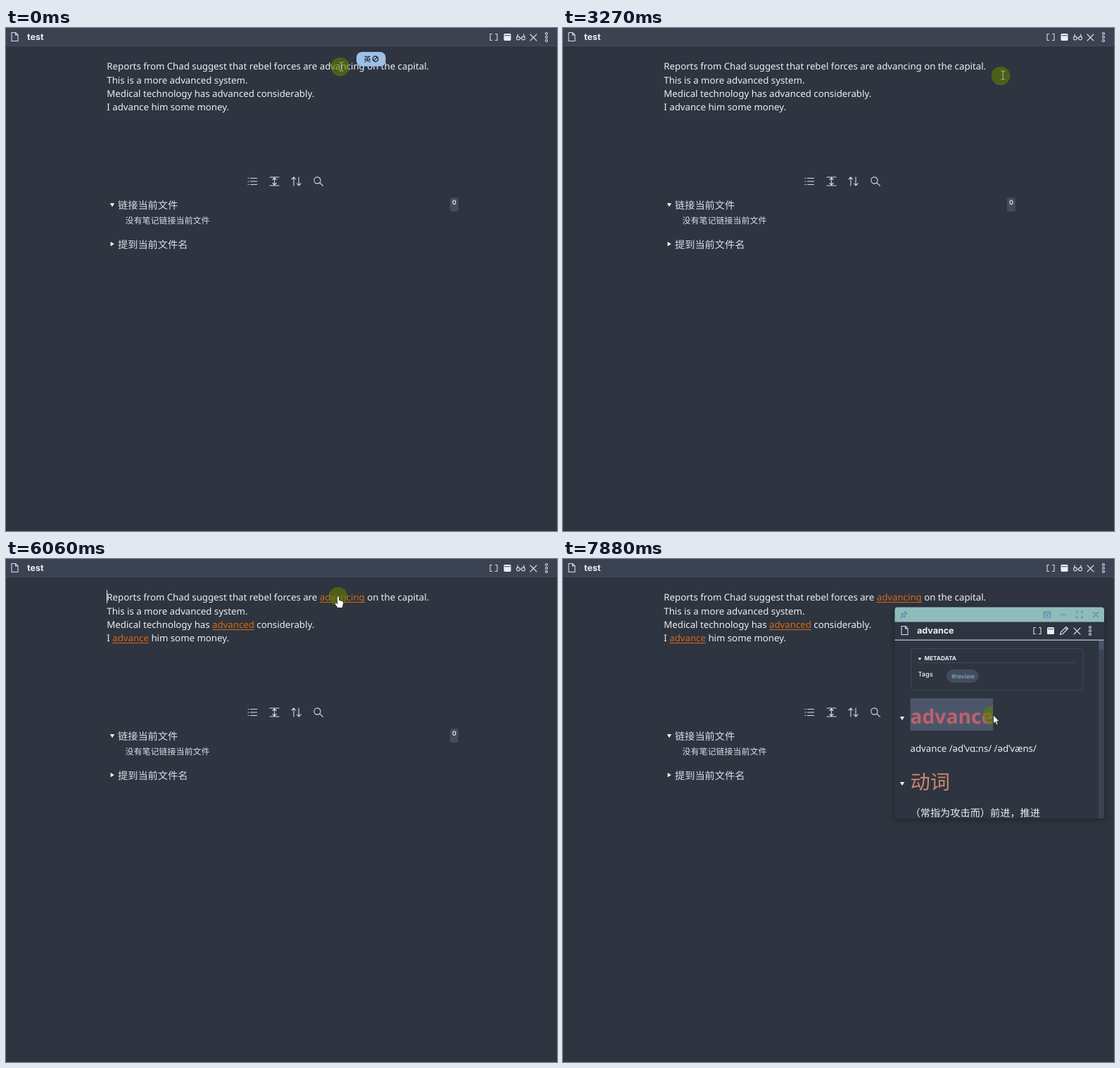
An HTML page with a canvas for the animation above (8 s loop, 783 by 715 pixels).

```html
<!DOCTYPE html>
<html lang="zh">
<head>
<meta charset="utf-8">
<title>Note editor</title>
<style>
html, body { margin: 0; width: 100%; height: 100%; overflow: hidden; background: #2e3440; }
canvas { display: block; }
</style>
</head>
<body>
<canvas id="stage" width="783" height="715"></canvas>
<script>
const ctx = document.getElementById('stage').getContext('2d');
ctx.textRendering = 'geometricPrecision';

const LOOP = 8000;
const BODY = '"Noto Sans", "Noto Sans CJK SC", sans-serif';
const UI = 'Inter, "Noto Sans CJK SC", sans-serif';
const CJK = '"Noto Sans CJK SC", "Noto Sans CJK", sans-serif';
const C = {
  bg: '#2e3440', bar: '#3b4252', edge: '#434c5e', select: '#4c566a',
  text: '#eceff4', soft: '#d8dee9', link: '#d8690f', teal: '#8fbcbb',
  blue: '#5e81ac', red: '#bf616a', orange: '#d08770'
};

// Pointer: bursts of movement [start, end, steps] and the path [time, x, y]
const BURSTS = [
  [1290, 1930, 8], [2470, 3270, 10], [3360, 3630, 4],
  [5450, 6250, 10], [6520, 7320, 10], [7520, 7880, 5]
];
const PATH = [
  [1280, 475, 55], [1380, 507, 60], [1460, 528, 65], [1650, 555, 82], [1930, 565, 97],
  [2640, 565, 97], [2900, 596, 82], [3270, 622, 68], [3360, 624, 67], [3630, 621, 63],
  [5450, 621, 63], [5530, 612, 60], [5720, 548, 55], [5980, 472, 53],
  [6520, 472, 53], [6780, 524, 118], [6900, 531, 160], [7060, 514, 214], [7150, 504, 226],
  [7320, 497, 224], [7520, 497, 224], [7880, 610, 222]
];
const POINTERS = [
  [0, 'beam'], [1290, 'arrow'], [1375, 'hand'], [2560, 'beam'], [5800, 'hand'],
  [6600, 'arrow'], [7050, 'beam'], [7870, 'arrow']
];
const CARETS = [
  [2560, 3090, 475], [3630, 4160, 475], [4700, 4980, 475],
  [4980, 5450, 143], [5980, 6170, 143]
];
const T = { menu: 920, bubble: 1010, close: 2560, links: 4980, popup: 6170, focus: 6340, drag: 7520 };

function stepTime(t) {
  let held = 0;
  for (const [start, end, n] of BURSTS) {
    if (t < start) break;
    const gap = (end - start) / (n - 1);
    held = Math.min(end, start + Math.floor((t - start + 12) / gap) * gap);
  }
  return held;
}

function pathAt(t) {
  if (t <= PATH[0][0]) return PATH[0].slice(1);
  for (let i = 1; i < PATH.length; i++) {
    const [t0, x0, y0] = PATH[i - 1], [t1, x1, y1] = PATH[i];
    if (t <= t1) {
      const k = (t - t0) / (t1 - t0);
      return [x0 + (x1 - x0) * k, y0 + (y1 - y0) * k];
    }
  }
  return PATH[PATH.length - 1].slice(1);
}

function text(str, x, y, font, color = C.text, align = 'left') {
  ctx.font = font;
  ctx.fillStyle = color;
  ctx.textAlign = align;
  ctx.fillText(str, x, y);
}

function rect(x, y, w, h, color) {
  ctx.fillStyle = color;
  ctx.fillRect(x, y, w, h);
}

function round(x, y, w, h, r, fill, stroke) {
  ctx.beginPath();
  ctx.roundRect(x, y, w, h, r);
  if (fill) { ctx.fillStyle = fill; ctx.fill(); }
  if (stroke) { ctx.strokeStyle = stroke; ctx.lineWidth = 1; ctx.stroke(); }
}

function shape(d, x, y, { fill, stroke, width = 1 }) {
  const p = new Path2D(d);
  ctx.save();
  ctx.translate(x, y);
  ctx.lineJoin = ctx.lineCap = 'round';
  if (fill) { ctx.fillStyle = fill; ctx.fill(p); }
  if (stroke) { ctx.strokeStyle = stroke; ctx.lineWidth = width; ctx.stroke(p); }
  ctx.restore();
}

const icon = (d, x, y, stroke = C.soft, width = 1.1) => shape(d, x, y, { stroke, width });

// Icon outlines, centred on 0,0
const I = {
  file: 'M-4.5-6H1L4.5-2.5V6H-4.5ZM1-6V-2.5H4.5',
  brackets: 'M-2.5-4.5H-5V4.5H-2.5M2.5-4.5H5V4.5H2.5',
  glasses: 'M-6 1.5L-4-4M6 1.5L4-4M-1.2 1.5a2.4 2.4 0 1 1-4.8 0a2.4 2.4 0 1 1 4.8 0H1.2a2.4 2.4 0 1 0 4.8 0a2.4 2.4 0 1 0-4.8 0',
  cross: 'M-4.5-4.5L4.5 4.5M4.5-4.5L-4.5 4.5',
  dots: 'M1.5-5a1.5 1.5 0 1 1-3 0a1.5 1.5 0 1 1 3 0M1.5 0a1.5 1.5 0 1 1-3 0a1.5 1.5 0 1 1 3 0M1.5 5a1.5 1.5 0 1 1-3 0a1.5 1.5 0 1 1 3 0',
  pencil: 'M-5.5 5.5L-4.5 2L3-5.5L5.5-3L-2 4.5ZM1.5-4L4-1.5',
  list: 'M-2.5-4.5H6.5M-2.5 0H6.5M-2.5 4.5H6.5M-6-4.5H-5M-6 0H-5M-6 4.5H-5',
  height: 'M-6.5-6H6.5M-6.5 6H6.5M0-5V5M-2.5-2.5L0-5L2.5-2.5M-2.5 2.5L0 5L2.5 2.5',
  sort: 'M-3.5 6V-6M-6.5-3L-3.5-6L-.8-3M3.5-6V6M.8 3L3.5 6L6.5 3',
  search: 'M3-1.5a4.6 4.6 0 1 1-9.2 0a4.6 4.6 0 1 1 9.2 0M1.8 2L6.5 6.3',
  check: 'M-4.5 .5L-1.5 3.5L5-3.5',
  help: 'M5.3 0a5.3 5.3 0 1 1-10.6 0a5.3 5.3 0 1 1 10.6 0M-1.6-1.2Q-1.5-2.8 0-2.8T1.6-1.2Q1.5-.2 0 .8M0 2.8V3',
  cut: 'M-2 2.8a1.8 1.8 0 1 1-3.6 0a1.8 1.8 0 1 1 3.6 0M-2-2.8a1.8 1.8 0 1 1-3.6 0a1.8 1.8 0 1 1 3.6 0M-2.3 1.8L5.5-3.8M-2.3-1.8L5.5 3.8',
  copy: 'M-1.5-5.5H2.5L5.5-2.5V3H-1.5ZM2.5-5.5V-2.5H5.5M-1.5-3H-5.5V5.5H2V3',
  paste: 'M-4.5-5.5H2.5V-3.5M-4.5-5.5V4H-2M-2-3.5H4.8V5.5H-2ZM-.5-1H3.3M-.5 1H3.3M-.5 3H3.3M-3-3.5H0',
  clip: 'M-4-4.5H4V5.5H-4ZM-1.5-5.5H1.5V-3.5H-1.5ZM-1.5-1H1.5M0-1V3',
  pin: 'M-5 5L-1.8 1.8M-4-1L1 4M-2.5-1L1-2L1.5-4.5L4.8-1.2L2-.5L1 3',
  expand: 'M-4.5-2V-4.5H-2M2-4.5H4.5V-2M4.5 2V4.5H2M-2 4.5H-4.5V2',
  panel: 'M-4.5-4H4.5V4H-4.5ZM-4.5-1.8H4.5M-1.5 .3L0 2L1.5 .3'
};

function book(x, y) {
  round(x - 5, y - 5, 10, 10, 1.5, C.text);
  rect(x - 4, y - 2.8, 8, 1, C.bar);
}

function triangle(x, y, open) {
  shape(open ? 'M-3.2-2.4H3.2L0 2.8Z' : 'M-2.4-3.2V3.2L2.8 0Z', x, y, { fill: C.text });
}

function headerBar() {
  rect(0, 0, 783, 25, C.bar);
  rect(0, 25, 783, 1, C.edge);
  icon(I.file, 12.5, 12.5);
  text('test', 30, 17, `bold 12.5px ${UI}`);
  icon(I.brackets, 693, 13);
  book(712.5, 13);
  icon(I.glasses, 731.5, 13);
  icon(I.cross, 749.5, 13.5);
  icon(I.dots, 768, 13);
}

const LINES = [
  'Reports from Chad suggest that rebel forces are |advancing| on the capital.',
  'This is a more advanced system.',
  'Medical technology has |advanced| considerably.',
  'I |advance| him some money.'
];

function note(linked) {
  const font = `13.24px ${BODY}`;
  LINES.forEach((line, row) => {
    let x = 143.3;
    const y = Math.round(59.2 + row * 19.35);
    line.split('|').forEach((part, i) => {
      const hot = linked && i === 1;
      text(part, x, y, font, hot ? C.link : C.text);
      const w = ctx.measureText(part).width;
      if (hot) rect(x, y + 2, w, 1, C.link);
      x += w;
    });
  });
}

function backlinks() {
  icon(I.list, 350, 218);
  icon(I.height, 381.5, 218);
  icon(I.sort, 412.5, 218);
  icon(I.search, 444, 218);
  triangle(151, 251.5, true);
  text('链接当前文件', 159, 257, `14.2px ${CJK}`, C.soft);
  text('没有笔记链接当前文件', 169.5, 278, `12px ${CJK}`, C.soft);
  triangle(151, 307, false);
  text('提到当前文件名', 159, 313, `14.2px ${CJK}`, C.soft);
  round(631, 241, 12, 20, 3, C.edge);
  text('0', 637, 251, `600 9px ${UI}`, C.text, 'center');
}

function bubble(late) {
  const y = late ? 23 : 34;
  round(498, y, 41.5, 20.5, 8, '#9dc0e6');
  text(late ? '中' : '英', 508.5, y + 13.8, `10.2px ${CJK}`, '#111');
  if (late) shape('M1.3 0a1.3 1.3 0 1 1-2.6 0a1.3 1.3 0 1 1 2.6 0', 523.5, y + 12.5, { stroke: '#111' });
  else shape('M3.8 0a3.8 3.8 0 1 1-7.6 0a3.8 3.8 0 1 1 7.6 0M2.6-2.6L-2.6 2.6', 525, y + 10, { stroke: '#111', width: 1.2 });
}

function shadow(blur, draw) {
  ctx.save();
  ctx.shadowColor = 'rgba(0,0,0,.35)';
  ctx.shadowBlur = blur;
  ctx.shadowOffsetY = 2;
  draw();
  ctx.restore();
}

function menu([px, py]) {
  shadow(8, () => round(477, 56.5, 226, 180, 3, C.bg));
  round(477.5, 56.5, 226, 180, 3, null, C.edge);
  if (px > 478 && py >= 60) rect(478, py < 84 ? 60 : 85, 225, 23.5, C.bar);
  rect(478, 110, 225, 1, C.edge);
  const cjk = `10.6px ${CJK}`;
  [['check', '标注为认识', 73], ['help', '标注为未知', 97]].forEach(([name, label, y]) => {
    icon(I[name], 493.5, y - 0.5, C.text);
    text('Shell commands: Execute:', 508.3, y + 3.7, `10.5px ${UI}`);
    text(label, 640, y + 4, cjk);
  });
  const rows = [['cut', '剪切'], ['copy', '复制'], ['paste', '粘贴'], ['clip', '以纯文本形式粘贴'], ['all', '全选']];
  rows.forEach(([name, label], i) => {
    const y = 127 + i * 23.9;
    if (name === 'all') {
      ctx.save();
      ctx.setLineDash([1.5, 1.5]);
      ctx.lineWidth = 1;
      ctx.strokeStyle = C.soft;
      ctx.strokeRect(488.5, y - 6, 10.5, 10.5);
      ctx.restore();
      icon('M-3-2.5H3M-3 0H3M-3 2.5H3', 493.7, y - 0.7);
    } else icon(I[name], 493.5, y - 0.5);
    text(label, 508, y + 4, cjk);
  });
}

// Right edge of the selected letters for a pointer at x
function selectionEnd(word, x0, x) {
  let end = x0;
  for (let i = 1; i <= word.length; i++) {
    const edge = x0 + ctx.measureText(word.slice(0, i)).width;
    if ((end + edge) / 2 < x) end = edge;
    else break;
  }
  return end;
}

function popup(t, [px]) {
  shadow(10, () => round(471.5, 68.5, 297.5, 300.5, 4, C.bg));
  ctx.save();
  ctx.beginPath();
  ctx.roundRect(471.5, 68.5, 297.5, 300.5, 4);
  ctx.clip();
  rect(471, 68, 299, 21.5, C.teal);
  icon(I.pin, 484.5, 79, C.blue);
  icon(I.panel, 688, 79, C.blue);
  icon('M-4 0H4', 711, 79, C.blue);
  icon(I.expand, 734, 79, C.blue);
  icon('M-3.5-3.5L3.5 3.5M3.5-3.5L-3.5 3.5', 757, 79, C.blue);

  icon(I.file, 485.5, 101.5);
  text('advance', 503, 106, `bold 12.5px ${UI}`);
  icon(I.brackets, 674, 102);
  book(693, 102);
  icon(I.pencil, 712, 102);
  icon(I.cross, 730.5, 102.5);
  icon(I.dots, 749, 102);
  rect(471, 114.5, 299, 1.5, t >= T.focus ? C.teal : C.edge);

  rect(761, 116, 8, 253, C.bar);
  round(761.5, 116, 7, 13, 3, C.select);
  round(494.5, 127.5, 244.5, 59, 3, null, '#404859');
  shape('M-2.5-1.5H2.5L0 2Z', 507, 142, { fill: C.text });
  text('METADATA', 513.5, 144.3, `bold 8.2px ${UI}`);
  rect(505, 147, 223, 1, '#404859');
  text('Tags', 504.5, 167.3, `500 9.2px ${UI}`);
  round(545, 157, 45.5, 19, 9.5, C.edge);
  text('#review', 552, 170, `8.9px ${UI}`, C.teal);

  ctx.font = `600 28.2px ${BODY}`;
  if (t >= T.drag) {
    ctx.textAlign = 'left';
    const end = selectionEnd('advance', 493.5, px);
    rect(493.5, 198, end - 493.5, 46, C.select);
  }
  triangle(482, 226.5, true);
  text('advance', 493.5, 233.5, `600 28.2px ${BODY}`, C.red);
  text('advance /ədˈvɑ:ns/ /ədˈvæns/', 493.5, 274, `13.24px ${BODY}`);
  triangle(482, 319.5, true);
  text('动词', 493.5, 327, `300 28.2px ${CJK}`, C.orange);
  text('（常指为攻击而）前进，推进', 493.5, 366, `14.2px ${CJK}`);
  ctx.restore();
}

const CURSORS = {
  beam: ['M-2.5-6H-.8L0-5.4L.8-6H2.5M0-5.4V5.4M-2.5 6H-.8L0 5.4L.8 6H2.5', { stroke: '#aeb4bb', width: 1 }],
  hand: ['M-1.5 1Q0-1 1.5 1V5.5L6 6.8Q7.8 7.3 7.6 9.3L6.8 13.5L6 16.5H-.8L-4.6 11Q-5 9-3 9.2L-1.5 10.5Z', { fill: '#fff', stroke: '#222', width: .8 }],
  arrow: ['M0 0V12L2.8 9.5L4.7 13.7L6.6 12.8L4.8 8.8H8.4Z', { fill: '#fff', stroke: '#222', width: .8 }]
};

function pointer(t, [hx, hy], [x, y]) {
  ctx.save();
  if (t >= T.drag) {
    ctx.beginPath();
    ctx.rect(0, 0, 611, 715);
    ctx.clip();
  }
  ctx.fillStyle = 'rgba(98,125,0,.6)';
  ctx.beginPath();
  ctx.arc(hx, hy, 13.3, 0, Math.PI * 2);
  ctx.fill();
  ctx.restore();
  const kind = POINTERS.filter(p => t >= p[0]).pop()[1];
  const [d, style] = CURSORS[kind];
  shape(d, x + (kind === 'hand' ? 0 : 1.5), y, style);
}

function draw(t) {
  const held = stepTime(t);
  const halo = pathAt(held), tip = pathAt(held + 80); // the halo trails the pointer
  rect(0, 0, 783, 715, C.bg);
  headerBar();
  note(t >= T.links);
  backlinks();
  for (const [on, off, x] of CARETS) {
    if (t >= on && t < off) rect(x, 44, 1, 19, C.text);
  }
  if (t >= T.menu && t < T.close) menu(tip);
  if (t < T.close) bubble(t >= T.bubble);
  if (t >= T.popup) popup(t, tip);
  pointer(t, halo, tip);
}

function frame() {
  draw(performance.now() % LOOP);
  requestAnimationFrame(frame);
}
frame();
</script>
</body>
</html>
```
